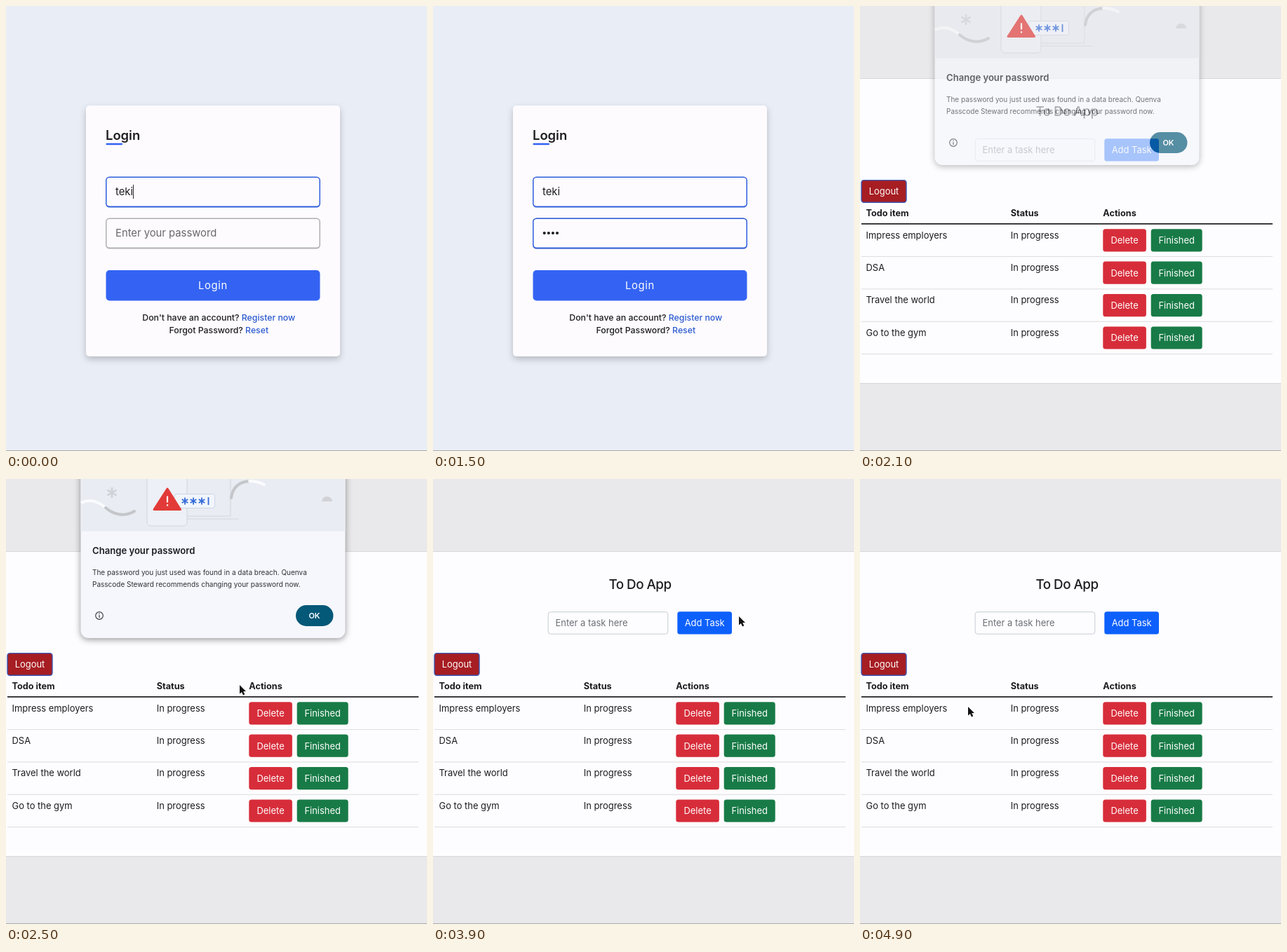
An HTML page that plays this animation: 600 px wide and 635 px high, repeating every 5 s.

```html
<!DOCTYPE html>
<html lang="en">
<head>
<meta charset="utf-8">
<title>Login and to-do list</title>
<style>
  html, body { margin: 0; width: 100%; height: 100%; overflow: hidden; background: #e9edf6; }
  svg { display: block; width: 600px; height: 635px; }
  text { font-family: Inter, "Open Sans", sans-serif; font-size: 12.95px; fill: #1d1d21; white-space: pre; }
  .mid { text-anchor: middle; }
  .light { fill: #fff; }
  .bold { font-weight: 700; font-size: 12.7px; }
  .field { font-size: 14.8px; }
  .link { font-size: 12.3px; font-weight: 500; text-anchor: middle; }
  .link tspan { fill: #2d5bd0; }
  .note { font-size: 10px; fill: #303134; }
  .card { filter: drop-shadow(0 4px 5px rgba(0, 0, 0, .22)); }
  .sheet { filter: drop-shadow(0 2px 5px rgba(0, 0, 0, .42)); }
</style>
</head>
<body>
<svg viewBox="0 0 600 635">
  <g id="login">
    <rect width="600" height="635" fill="#e9edf6"/>
    <rect class="card" x="114" y="142" width="362" height="358" rx="5" fill="#fdfbfe"/>
    <text x="142" y="191" font-weight="600" style="font-size:18.4px">Login</text>
    <rect x="142.5" y="195.7" width="23.5" height="2.5" rx="1" fill="#3362f3"/>

    <rect x="142" y="243.5" width="306" height="44" rx="5.5" fill="#2f5fdc"/>
    <rect x="143.5" y="245" width="303" height="40.5" rx="4" fill="#fdfbfe"/>
    <text class="field" x="156" y="270">teki</text>

    <rect x="142" y="302.5" width="306" height="44" rx="5.5" fill="#b0afb2"/>
    <rect id="focus" x="142" y="302.5" width="306" height="44" rx="5.5" fill="#2f5fdc"/>
    <rect x="143.5" y="304" width="303" height="40.5" rx="4" fill="#fdfbfe"/>
    <text id="hint" class="field" x="156" y="329" style="fill:#68676b">Enter your password</text>
    <g id="dots" fill="#202024"></g>
    <rect id="caret" width="1" height="20" fill="#29292d"/>

    <rect x="142.5" y="377" width="305" height="43.5" rx="5" fill="#3463f3"/>
    <text class="field mid light" x="295" y="403.7" letter-spacing=".7">Login</text>
    <text class="link" x="303.3" y="448.5">Don't have an account? <tspan>Register now</tspan></text>
    <text class="link" x="303.3" y="466.5">Forgot Password? <tspan>Reset</tspan></text>
  </g>

  <g id="todo">
    <rect width="600" height="635" fill="#e9e8ea"/>
    <rect y="103" width="600" height="436" fill="#d8d7da"/>
    <rect y="104" width="600" height="434" fill="#fdfcfe"/>
    <text class="mid" x="295" y="157" font-weight="500" letter-spacing="-.5" style="font-size:18.8px">To Do App</text>
    <rect x="164.2" y="189.7" width="170.6" height="31.5" rx="3.5" fill="#fdfcfe" stroke="#c6cdd5"/>
    <text x="174.5" y="210.3" style="fill:#6b7077">Enter a task here</text>
    <rect x="2" y="248.6" width="64" height="31.6" rx="3.5" fill="#a61d22" stroke="#3a58b4" stroke-width="1.4"/>
    <text class="mid light" x="34" y="269.3">Logout</text>
    <text class="bold" x="8.5" y="300">Todo item</text>
    <text class="bold" x="214.7" y="300">Status</text>
    <text class="bold" x="346.3" y="300">Actions</text>
    <rect x="2" y="310" width="586" height="1.7" fill="#1d1d21"/>
    <g id="rows"></g>

    <g id="dialog">
      <rect class="sheet" x="106.5" y="-30" width="377" height="257" rx="11" fill="#f5f7fc"/>
      <path d="M106.5 0H483.5V74.5H106.5Z" fill="#e9ecf2"/>
      <g fill="none" stroke-linecap="round">
        <path d="M107 34C119 28 130 31 141 40" stroke="#fafbfd" stroke-width="4" stroke-linecap="butt"/>
        <path d="M142 41C152 50 168 55 183 46" stroke="#c4c6ca" stroke-width="4"/>
        <path d="M151 12V27M144.5 15.7L157.5 23.3M144.5 23.3L157.5 15.7" stroke="#d0d2d7" stroke-width="2.6" stroke-linecap="butt"/>
        <path d="M258 57H331M258 53H320V-2" stroke="#d2d5dc"/>
        <path d="M201 -2V61Q201 67 207 67H252Q258 67 258 61V-2" fill="#edf0f6" stroke="#d2d5dc"/>
        <path d="M321 27C323 11 333 4 347 3" stroke="#c4c6ca" stroke-width="4"/>
        <path d="M347 3Q359 3 368 8" stroke="#fafbfd" stroke-width="4"/>
      </g>
      <path d="M450 32A7.5 7 0 0 1 465 32Z" fill="#d0d2d7"/>
      <rect x="240" y="21.5" width="57.5" height="20" rx="3" fill="#f1f5fc" stroke="#cdd5e4"/>
      <g id="stars" stroke="#346bd8" stroke-width="1.8"><path d="M288.5 26V37"/></g>
      <path d="M230 14L211 43.5H248.5Z" fill="#e23a38" stroke="#e23a38" stroke-width="3" stroke-linejoin="round"/>
      <path d="M230 24.5V33.5M230 36.3V38.6" stroke="#fff" stroke-width="2.2"/>
      <text x="123" y="107" font-weight="600" style="font-size:13.1px">Change your password</text>
      <text class="note" x="123" y="137.3">The password you just used was found in a data breach. Quenva</text>
      <text class="note" x="123" y="154.3">Passcode Steward recommends changing your password now.</text>
      <circle cx="133" cy="195" r="5.3" fill="none" stroke="#3d4045" stroke-width="1.2"/>
      <path d="M133 194V198M133 191.6V192.9" stroke="#3d4045" stroke-width="1.2"/>
      <rect x="413" y="180" width="53.5" height="30" rx="15" fill="#045878"/>
      <text class="mid light" x="439.5" y="199" font-weight="600" style="font-size:11px">OK</text>
    </g>

    <path id="cursor" d="M0 0V12.6L2.9 10L5.1 14.4L7.3 13.3L5.2 9.1H9Z" fill="#111" stroke="#fff" stroke-width="1" paint-order="stroke" stroke-linejoin="round"/>
  </g>
  <rect y="634" width="600" height="1" fill="#aaaaae"/>
</svg>
<script>
const $ = id => document.getElementById(id);
const add = (id, markup) => $(id).insertAdjacentHTML("beforeend", markup);
const clamp = v => Math.max(0, Math.min(1, v));
const ramp = (t, from, to) => clamp((t - from) / (to - from));
const show = (id, on) => $(id).setAttribute("opacity", +on);
const move = (id, x, y) => $(id).setAttribute("transform", `translate(${x} ${y})`);

const LOOP = 5000, STEP = 100;
const keyTimes = [600, 700, 800, 1000];
const pointer = [
  [2300, 268, 356], [2500, 333, 294], [2900, 364, 258], [3300, 408, 215],
  [3500, 438, 193], [3900, 436, 196], [4200, 414, 205], [4500, 292, 262],
  [4700, 196, 307], [4900, 154, 325]
];

const button = (x, y, w, color, label) =>
  `<rect x="${x}" y="${y}" width="${w}" height="32.2" rx="3.5" fill="${color}"/>
   <text class="mid light" x="${x + w / 2}" y="${y + 20.9}">${label}</text>`;

add("rows", button(348.3, 189.3, 77.7, "#0d60fb", "Add Task"));
["Impress employers", "DSA", "Travel the world", "Go to the gym"].forEach((task, i) => {
  const y = 311 + i * 46.4;
  add("rows", `<text x="8.5" y="${y + 20.6}">${task}</text>
    <text x="214.7" y="${y + 20.6}">In progress</text>
    ${button(346.3, y + 7.2, 61.6, "#d72d3a", "Delete")}
    ${button(414.7, y + 7.2, 73, "#187b47", "Finished")}
    <rect x="2" y="${y + 46}" width="586" height="1" fill="#dddde0"/>`);
});

keyTimes.forEach((_, i) => add("dots", `<circle cx="${158.7 + i * 6.1}" cy="324" r="2.1"/>`));
for (let i = 0; i < 3; i++) {
  add("stars", `<path transform="translate(${255 + i * 12} 31.5)" d="M0 -5V5M-4.3 -2.5L4.3 2.5M-4.3 2.5L4.3 -2.5"/>`);
}

function pointerAt(t) {
  const i = Math.max(1, pointer.findIndex(p => p[0] >= t));
  const [a, b] = [pointer[i - 1], pointer[i]];
  const k = ramp(t, a[0], b[0]);
  return [a[1] + (b[1] - a[1]) * k, a[2] + (b[2] - a[2]) * k];
}

function draw(t) {
  show("login", t < 1800);
  show("todo", t >= 1800);

  const typed = keyTimes.filter(k => k <= t).length;
  show("focus", ramp(t, 200, 500));
  show("hint", !typed);
  [...$("dots").children].forEach((dot, i) => dot.setAttribute("opacity", +(i < typed)));
  show("caret", t < 1300);
  if (t < 300) move("caret", 181, 255);
  else move("caret", 156 + typed * 6.2, 314);

  show("dialog", Math.min(ramp(t, 1900, 2200), 1 - ramp(t, 3500, 3700)));
  show("cursor", t >= 2300);
  move("cursor", ...pointerAt(t));
}

const start = performance.now();
function tick() {
  const t = (performance.now() - start) % LOOP;
  draw(Math.floor(t / STEP) * STEP);
  requestAnimationFrame(tick);
}
tick();
</script>
</body>
</html>
```
